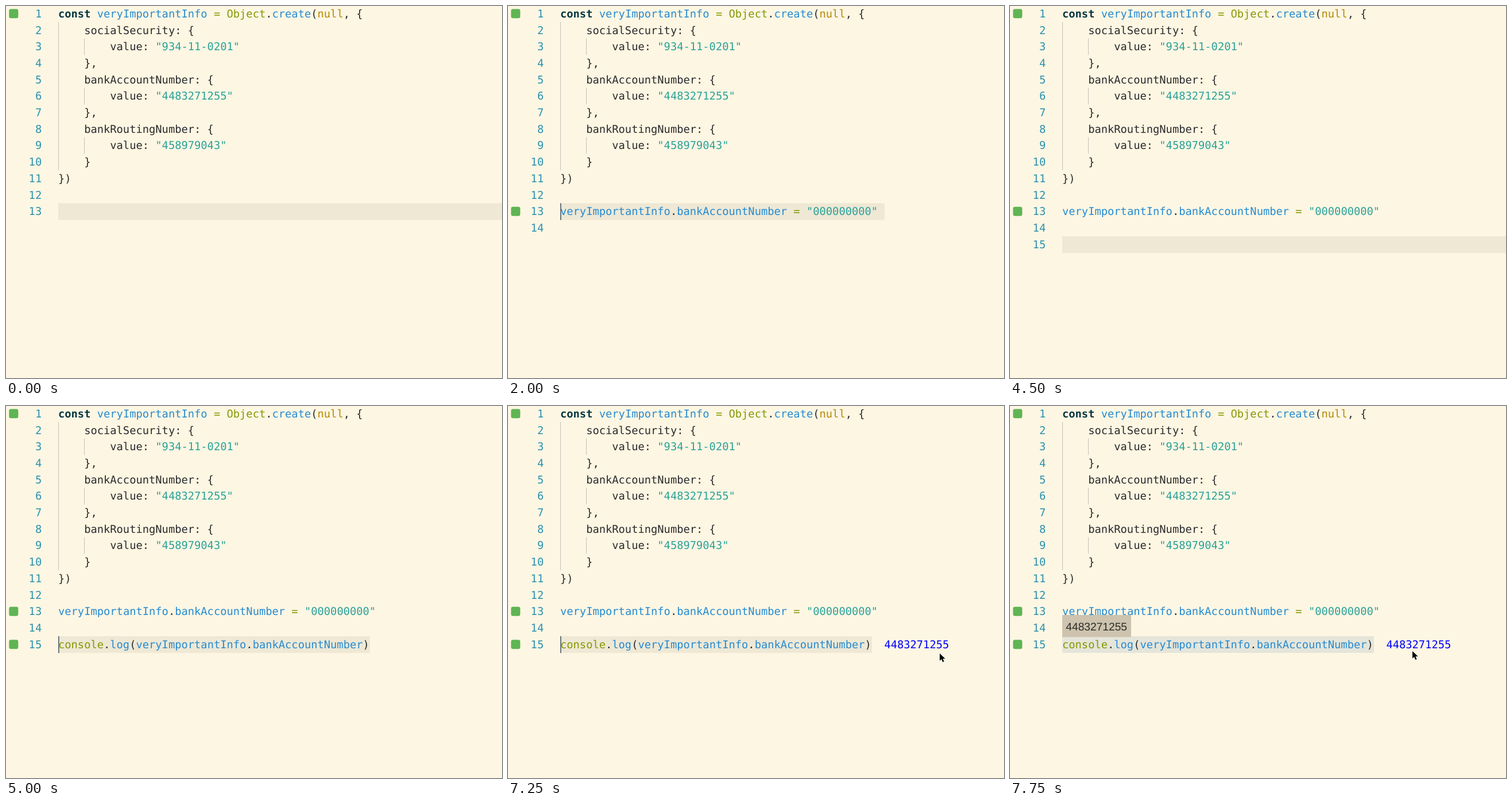
These frames come from a looping animation (864 px wide and 648 px high, 8000 ms). An HTML page:

```html
<!DOCTYPE html>
<html lang="en">
<head>
<meta charset="utf-8">
<title>Code editor</title>
<style>
  html, body { margin: 0; width: 100%; height: 100%; overflow: hidden; background: #fdf6e3; }
  svg { display: block; width: 864px; height: 648px; }
  text {
    font: 18.75px "DejaVu Sans Mono", monospace;
    white-space: pre;
    text-rendering: geometricPrecision;
  }
  .p { fill: #2b2b2b; }
  .k { fill: #073642; font-weight: bold; }
  .v { fill: #268bd2; }
  .o { fill: #859900; }
  .n { fill: #b58900; }
  .s { fill: #2aa198; }
  .out { fill: #0000ff; }
  .num { fill: #2b91af; text-anchor: end; }
  .mark { fill: #5fb553; }
  .guide { fill: #c3c0b4; }
  #tip text { font: 19.2px "Liberation Sans", Arial, sans-serif; }
</style>
</head>
<body>
<svg viewBox="0 0 864 648">
  <rect width="864" height="648" fill="#fdf6e3"/>
  <rect id="band" x="91" height="29.2"/>
  <g id="base"></g>
  <g id="assign"></g>
  <g id="blank"></g>
  <g id="log"></g>
  <g id="output"></g>
  <rect id="caret" x="91" width="1.7" height="29.4" fill="#52656c"/>
  <g id="tip">
    <rect x="91" y="364" width="120" height="38.5" fill="#cdc3ae"/>
    <text class="p" x="97.3" y="390.6">4483271255</text>
  </g>
  <path id="mouse" d="M1 1V13.8L4 11L6.2 16L8.6 15L6.4 10.2H10.6Z"
        fill="#000" stroke="#fff" stroke-width="1.2" stroke-linejoin="round" paint-order="stroke"/>
</svg>
<script>
(() => {
  const LOOP = 8000, LEFT = 91, CHAR = 11.288, PITCH = 28.71;
  const $ = id => document.getElementById(id);
  const rowTop = n => (n - 1) * PITCH - 1;
  const baseline = n => rowTop(n) + 20.8;

  // Each token is a class letter, a space, then its text.
  function code(n, col, ...tokens) {
    return tokens.map(token => {
      const text = token.slice(2), x = LEFT + col * CHAR;
      col += text.length;
      return `<text class="${token[0]}" x="${x}" y="${baseline(n)}">${text}</text>`;
    }).join("");
  }
  const number = n => `<text class="num" x="62.2" y="${baseline(n)}">${n}</text>`;
  const mark = n => `<rect class="mark" x="5.3" y="${rowTop(n) + 6.2}" width="16" height="16" rx="3.2"/>`;
  const guide = (n, col, rows) =>
    `<rect class="guide" x="${Math.round(LEFT + col * CHAR)}" y="${rowTop(n)}" width="1" height="${rows * PITCH}"/>`;
  const field = (n, key, value, end) =>
    code(n, 4, `p ${key}: {`) +
    code(n + 1, 8, "p value: ", `s "${value}"`) +
    code(n + 2, 4, "p " + end) + guide(n + 1, 4, 1);

  let base = mark(1) + guide(2, 0, 9);
  for (let n = 1; n <= 13; n++) base += number(n);
  $("base").innerHTML = base +
    code(1, 0, "k const", "v  veryImportantInfo", "o  = Object", "p .", "v create", "p (", "n null", "p , {") +
    field(2, "socialSecurity", "934-11-0201", "},") +
    field(5, "bankAccountNumber", "4483271255", "},") +
    field(8, "bankRoutingNumber", "458979043", "}") +
    code(11, 0, "p })");
  $("assign").innerHTML = mark(13) + number(14) +
    code(13, 0, "v veryImportantInfo", "p .", "v bankAccountNumber", "o  = ", 's "000000000"');
  $("blank").innerHTML = number(15);
  $("log").innerHTML = mark(15) +
    code(15, 0, "o console", "p .", "v log", "p (", "v veryImportantInfo", "p .", "v bankAccountNumber", "p )");
  $("output").innerHTML = `<text class="out" x="${LEFT + 50 * CHAR}" y="${baseline(15)}">4483271255</text>`;

  const show = (id, on) => $(id).setAttribute("visibility", on ? "visible" : "hidden");
  function set(id, attrs) {
    for (const key in attrs) $(id).setAttribute(key, attrs[key]);
  }

  // Pointer stops, one every 250 ms from 7000 ms.
  const stops = [[846, 430], [751, 430], [720, 429], [700, 426]];

  function draw(t) {
    const y = rowTop(t < 4000 ? 13 : 15);
    const right = t < 1000 ? 864 : t < 4000 ? 656 : t < 5000 ? 864 : 634;
    set("band", {
      y, width: right - LEFT,
      rx: right === 656 ? 2.5 : 0,
      fill: t < 7750 ? "#eee8d5" : "#e5e5da"
    });
    set("caret", { y });
    show("caret", t >= 500 && (t < 1000 || Math.floor(t / 500) % 2 === 0));
    show("assign", t >= 1000);
    show("blank", t >= 4000);
    show("log", t >= 5000);
    show("output", t >= 5500);
    show("tip", t >= 7750);
    show("mouse", t >= 7000);
    if (t >= 7000) {
      const at = stops[Math.floor((t - 7000) / 250)];
      set("mouse", { transform: `translate(${at})` });
    }
  }

  const start = performance.now();
  function tick() {
    draw((performance.now() - start) % LOOP);
    requestAnimationFrame(tick);
  }
  tick();
})();
</script>
</body>
</html>
```
